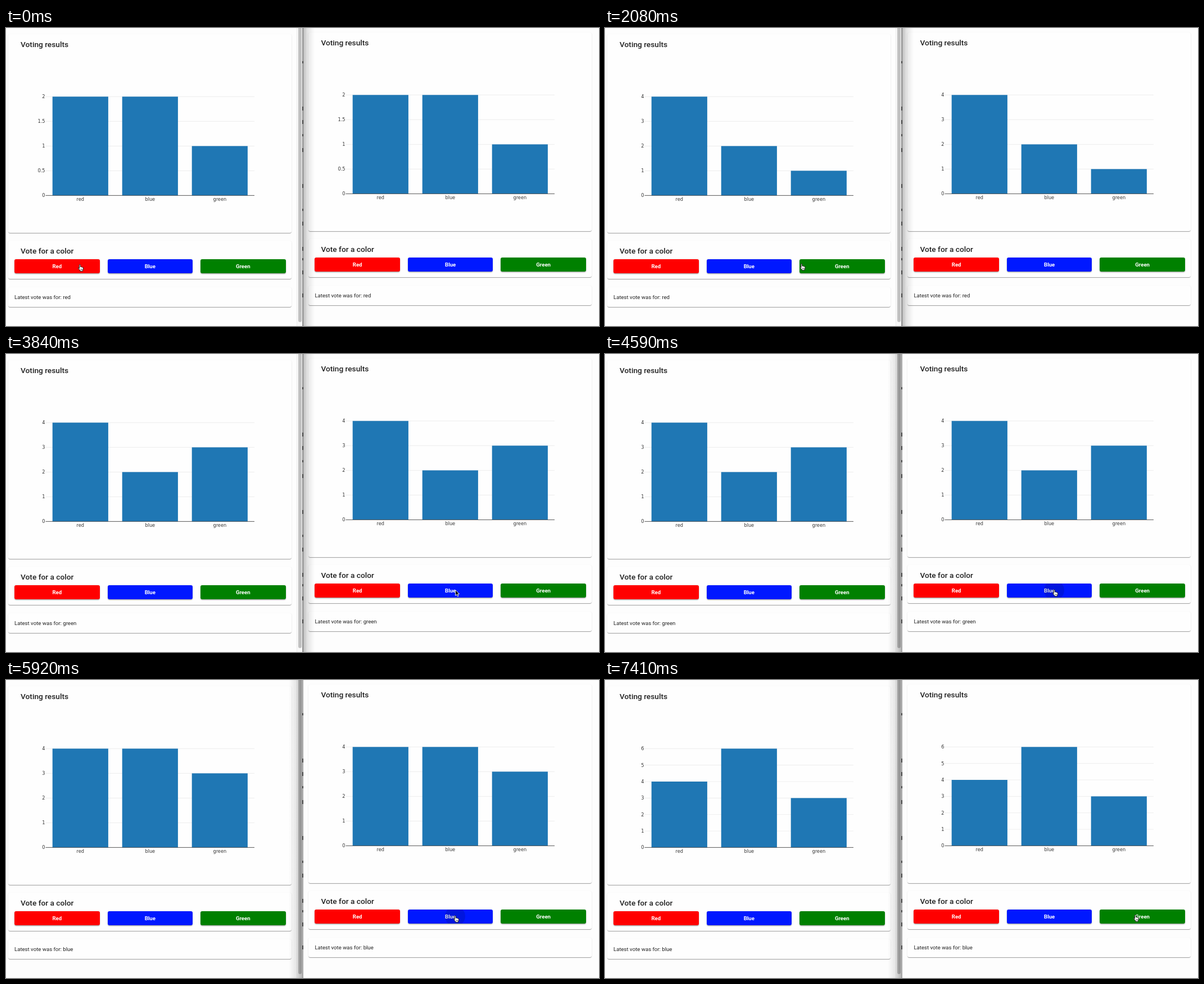
Recreate the animation shown at these times as an HTML page. Size 1055x531 px, loop 8000 ms.

```html
<!DOCTYPE html>
<html lang="en">
<head>
<meta charset="utf-8">
<title>Live voting</title>
<style>
html, body { margin: 0; width: 100%; height: 100%; overflow: hidden; }
body { position: relative; background: #fdfdfd; font-family: Roboto, sans-serif; color: #212121; }
div, svg, i { position: absolute; }
.panel { left: 0; top: 0; width: 508px; height: 531px; }
.panel + .panel { left: 534.4px; top: -2.7px; }
.card {
  left: 4px; width: 504px; border-radius: 3px; background: #fefefe;
  box-shadow: 0 1.4px .7px -.7px rgba(0,0,0,.28), 0 .7px .7px rgba(0,0,0,.16), 0 .7px 2px rgba(0,0,0,.12);
}
.text { white-space: nowrap; line-height: 20px; font-size: 9.6px; left: 15px; }
.title { left: 26px; font-size: 13.7px; font-weight: 500; }
.btn {
  top: 412px; width: 151.5px; height: 24.5px; border-radius: 3px; overflow: hidden;
  color: #fff; font: 700 9.6px/25px Roboto, sans-serif; text-align: center;
  box-shadow: 0 2px 1.4px -1.4px rgba(0,0,0,.25), 0 1.4px 1.4px rgba(0,0,0,.16), 0 .7px 3px rgba(0,0,0,.14);
}
.btn.down { box-shadow: 0 3px 3px -2px rgba(0,0,0,.25), 0 2px 4px rgba(0,0,0,.2); }
.btn i { border-radius: 50%; background: rgba(0,0,0,.13); }
.chart { left: 0; top: 0; font: 8.2px "DejaVu Sans", sans-serif; fill: #333; }
.track { left: 517px; top: 0; width: 10px; height: 531px; background: #f8f8f8; border-left: 1px solid #ececec; box-sizing: border-box; }
.thumb { left: 520px; top: -4px; width: 5.5px; height: 528px; border-radius: 3px; background: #c1c1c1; }
.edge { left: 527px; top: 0; width: 1.5px; height: 531px; background: #a6a6a6; }
.shade { top: 0; height: 531px; }
.right { left: 528px; width: 21px; background: linear-gradient(90deg, rgba(0,0,0,.27), rgba(0,0,0,.1) 40%, transparent); }
.left { left: 503px; width: 24px; background: linear-gradient(270deg, rgba(0,0,0,.27), rgba(0,0,0,.1) 40%, transparent); }
.speck { left: 526.7px; width: 2px; background: #444; }
#pointer { left: 0; top: 0; overflow: visible; }
</style>
</head>
<body>
<script>
const LOOP = 8000;
const COLORS = ['red', 'blue', 'green'];
const FILLS = ['#ff0000', '#0018ff', '#008000'];
const BTN_X = [15, 180.5, 346];
const ZERO = 298.4, PLOT_H = 176.1;

// time, red, blue, green, latest vote
const VOTES = [
  [0, 2, 2, 1, 'red'], [590, 3, 2, 1, 'red'], [1630, 4, 2, 1, 'red'],
  [2660, 4, 2, 2, 'green'], [3250, 4, 2, 3, 'green'], [4740, 4, 3, 3, 'blue'],
  [5480, 4, 4, 3, 'blue'], [6070, 4, 5, 3, 'blue'], [6960, 4, 6, 3, 'blue']
];
// time, x, y, shape
const MOVES = [
  [0, 128, 421, 'hand'], [1190, 129, 421, 'hand'], [1930, 240, 429, 'hand'],
  [2080, 346.5, 419.5, 'hand'], [2220, 372, 420, 'hand'], [2370, 385, 420, 'hand'],
  [3550, 470, 424, 'hand'], [3700, 640, 424, 'arrow'], [3840, 799, 420, 'arrow'],
  [3990, 796, 419.5, 'hand'], [7110, 832, 421, 'hand'], [7260, 905, 424, 'hand'],
  [7410, 940, 418, 'hand']
];
// start, end, panel, button
const CLICKS = [
  [440, 740, 0, 0], [1480, 1780, 0, 0], [2520, 2810, 0, 2], [3100, 3400, 0, 2],
  [4590, 5030, 1, 1], [5330, 5630, 1, 1], [5920, 6220, 1, 1], [6810, 7110, 1, 1]
];
const FOCUS = 3990;

const card = (y, h) => `<div class="card" style="top:${y}px;height:${h}px"></div>`;
const text = (cls, y, s) => `<div class="text ${cls}" style="top:${y - 10}px">${s}</div>`;
const button = (name, i) =>
  `<div class="btn" style="left:${BTN_X[i]}px;background:${FILLS[i]}">${name[0].toUpperCase() + name.slice(1)}<i></i></div>`;
const panel = () => `<div class="panel">
  ${card(11, 353.5)}${card(379, 68)}${card(462, 35)}
  ${text('title', 29, 'Voting results')}${text('title', 397, 'Vote for a color')}
  ${COLORS.map(button).join('')}${text('latest', 479.5, '')}
  <svg class="chart" width="508" height="364"></svg></div>`;
const speck = (y, i) => `<div class="speck" style="top:${y}px;height:${i % 3 ? 7 : 4}px"></div>`;

document.body.innerHTML = panel() + panel() + `
  <div class="track"></div><div class="thumb"></div><div class="edge"></div>
  ${[59, 140, 164, 189, 214, 278, 322, 345, 390, 410, 432, 473].map(speck).join('')}
  <div class="shade right"></div><div class="shade left"></div>
  <svg id="pointer" width="14" height="16" stroke-linejoin="round">
    <g id="hand" fill="#fff" stroke="#111" stroke-width=".9">
      <path d="M2.4 7.6V1.5a.95.95 0 0 1 1.9 0V4.6q1.8-.6 2 .5 1.5-.5 1.8.6 1.6-.3 1.5 1.2 0 2.3-1 3.6V12.2H3.8V11Q2.5 9.5.7 7.2.2 6.2 1.2 6q.7.1 1.2 1.1z"/>
      <path d="M5 8v2.4M6.4 8v2.4M7.8 8v2.4" stroke-width=".6"/>
    </g>
    <path id="arrow" fill="#000" stroke="#fff" stroke-width=".9"
      d="M.5 .6V10.4L2.8 8.3 4.4 12 6.1 11.3 4.5 7.7H7.6z"/>
  </svg>`;

const all = (sel, root = document) => [...root.querySelectorAll(sel)];
const charts = all('.chart'), latest = all('.latest');
const buttons = all('.panel').map(p => all('.btn', p));
const pointer = document.getElementById('pointer');
const at = (list, t) => list.filter(s => s[0] <= t).pop();
const show = (el, on) => { el.style.display = on ? '' : 'none'; };

function chart(values) {
  const max = Math.max(...values), step = max > 3 ? 1 : 0.5;
  const y = v => ZERO - v / max * PLOT_H;
  let out = '';
  for (let v = 0; v <= max; v += step) {
    out += `<text x="69.5" y="${y(v) + 3}" text-anchor="end">${v}</text>`;
    if (v) out += `<path d="M70.5 ${y(v)}H442" stroke="#eaeaea" stroke-width=".8"/>`;
  }
  values.forEach((v, i) => {
    const x = 132.3 + i * 124;
    out += `<rect x="${x - 49.6}" y="${y(v)}" width="99.2" height="${ZERO - y(v)}" fill="#1f77b4"/>
      <text x="${x}" y="307.8" text-anchor="middle">${COLORS[i]}</text>`;
  });
  return out + `<path d="M70.5 ${ZERO}H442" stroke="#444" stroke-width=".9"/>`;
}

function ripple(t, x, y) {
  all('.btn').forEach(b => {
    b.classList.remove('down');
    show(b.lastChild, false);
  });
  const click = CLICKS.find(c => t >= c[0] && t < c[1]);
  if (!click) return;
  const [start, , side, i] = click;
  const btn = buttons[side][i], dot = btn.lastChild;
  const cx = x + 3.5 - BTN_X[i] - side * 534.4, cy = y + 1 - 412 + side * 2.7;
  const full = Math.hypot(Math.max(cx, 151.5 - cx), Math.max(cy, 24.5 - cy));
  const phase = Math.floor((t - start) / 145);
  const r = phase ? full * (phase > 1 ? 1 : 0.94) : 18;
  Object.assign(dot.style, {
    left: cx - r + 'px', top: cy - r + 'px', width: 2 * r + 'px', height: 2 * r + 'px',
    opacity: phase > 1 ? 0.5 : 1
  });
  show(dot, true);
  btn.classList.toggle('down', start === CLICKS[0][0]);
}

let drawn;
function draw(t) {
  const state = at(VOTES, t);
  if (state !== drawn) {
    drawn = state;
    charts.forEach(c => { c.innerHTML = chart(state.slice(1, 4)); });
    latest.forEach(l => { l.textContent = 'Latest vote was for: ' + state[4]; });
  }
  const [, x, y, shape] = at(MOVES, t);
  pointer.style.transform = `translate(${x}px,${y}px)`;
  for (const id of ['hand', 'arrow']) show(document.getElementById(id), id === shape);
  show(document.querySelector('.right'), t < FOCUS);
  show(document.querySelector('.left'), t >= FOCUS);
  ripple(t, x, y);
}

const begin = performance.now();
function tick() {
  draw((performance.now() - begin) % LOOP);
  requestAnimationFrame(tick);
}
tick();
</script>
</body>
</html>
```
